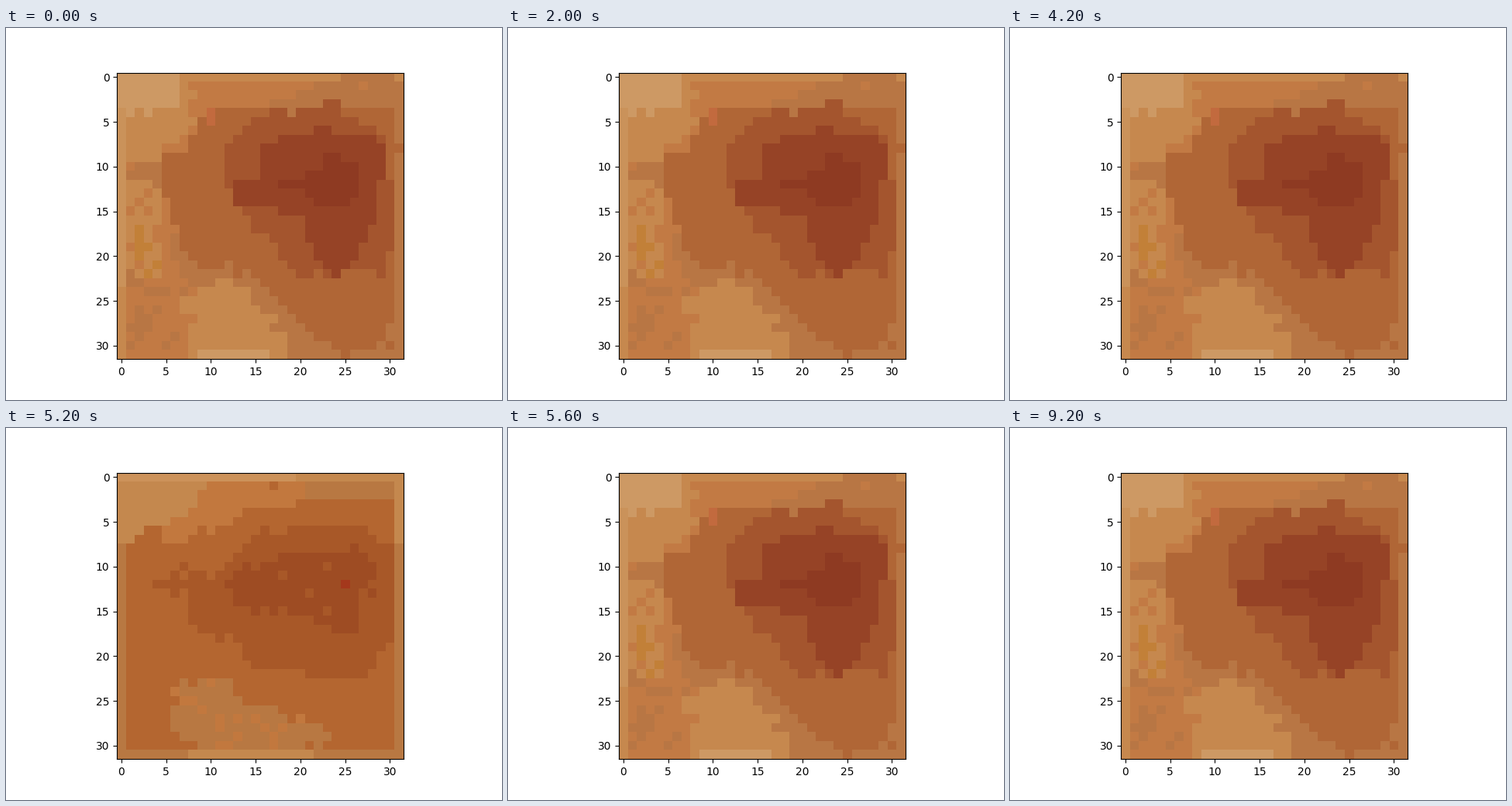
Write a matplotlib script that moves like this. It is 640x480 px and loops after 10000 ms.

```python
import numpy as np
import matplotlib.pyplot as plt
from matplotlib.animation import FuncAnimation
from matplotlib.path import Path

SIZE = 32
STEP_MS = 200
ROWS, COLS = np.mgrid[:SIZE, :SIZE]
CELLS = np.column_stack([COLS.ravel(), ROWS.ravel()])


class Skin:
    """A grid of coloured cells built up from rough-edged patches."""

    def __init__(self, color, seed):
        self.img = np.full((SIZE, SIZE, 3), color, dtype=np.uint8)
        self.rng = np.random.default_rng(seed)

    def patch(self, color, *corners, density=1.0, rough=0.3):
        probe = CELLS + self.rng.normal(0, rough, CELLS.shape)
        inside = Path(corners).contains_points(probe)
        inside &= self.rng.random(len(CELLS)) < density
        self.img[inside.reshape(SIZE, SIZE)] = color

    def box(self, color, left, top, right, bottom):
        self.img[top:bottom, left:right] = color


def offset_mole():
    pale, light, warm = (205, 153, 100), (198, 136, 78), (194, 122, 68)
    dull, brown, rust = (184, 118, 68), (176, 102, 54), (164, 85, 46)
    deep, core = (150, 67, 38), (142, 58, 34)
    s = Skin(warm, 4)
    s.patch(dull, (24, .5), (33, .5), (33, 33), (19, 33), (13, 24), (6, 23),
            (6, 18), (16, 3))
    s.patch(light, (-2, -2), (8, -2), (8, 6.5), (5, 8), (4, 10), (4.8, 14),
            (5, 20), (3, 23), (.5, 24), (.5, 33), (-2, 33))
    s.patch(warm, (.5, 10), (5, 10), (5, 23), (.5, 23), density=.25)
    s.patch(dull, (1.5, 9.6), (5.5, 9.6), (4.5, 11.4), (1.5, 11.4))
    s.patch(dull, (.5, 22), (7, 22), (7, 31), (.5, 31), density=.35)
    s.patch((194, 128, 56), (1.5, 15.5), (4.5, 15.5), (4.5, 25.5),
            (1.5, 25.5), density=.15)
    s.box((202, 146, 90), 0, 4, 1, 24)
    s.box(light, 7, 0, 32, 1)
    s.box(dull, 25, 0, 31, 1)
    s.patch(pale, (-2, -2), (6.5, -2), (6.5, 2.5), (4.5, 3.5), (-2, 3.5))
    s.patch(light, (7, 24), (13, 22.7), (16, 26), (18, 29), (18, 33),
            (7.5, 33), (7.5, 28))
    s.box(pale, 9, 31, 17, 32)
    s.patch(brown, (11, 3.5), (30.5, 3.5), (30.5, 27), (29, 31), (24, 31),
            (21, 29), (18, 25), (14, 22), (9, 21), (6.5, 19), (5.5, 15),
            (4.5, 10.5), (8, 6.5))
    s.patch(rust, (15, 4.5), (19, 3.5), (24, 3), (25, 4.5), (29.5, 6),
            (30.5, 18), (29, 22), (20, 22), (16, 18), (13, 15),
            (11.5, 12), (10.5, 9), (12, 7))
    s.patch(deep, (22, 5.5), (24, 6.4), (28.5, 6.5), (29.5, 8), (28.5, 14),
            (27, 18), (25, 22), (23, 22.5), (21, 18), (20.5, 15.5),
            (17, 14.5), (13, 14.4), (11.5, 11.5), (15.5, 11.5), (15.6, 7.6))
    s.patch(core, (23, 8), (26, 10), (26, 13), (24, 15), (19, 13),
            (18, 11.7), (22.5, 11))
    s.box((194, 106, 62), 10, 4, 11, 6)
    return s.img


def wide_mole():
    pale, light, warm = (204, 146, 90), (196, 136, 78), (194, 120, 62)
    dull, brown = (184, 120, 66), (180, 102, 48)
    rust, deep = (168, 88, 40), (158, 76, 35)
    s = Skin(brown, 7)
    s.patch(warm, (9, .5), (21, .5), (21, 2.5), (15, 3.5), (11, 5.5),
            (5, 7.5), (4, 6))
    s.patch(light, (-2, .5), (9.5, .5), (8.5, 3.5), (6, 5), (2, 6),
            (.5, 8), (-2, 8))
    s.box(dull, 21, 1, 31, 3)
    s.box(dull, 0, 8, 1, SIZE)
    s.box(dull, 31, 8, 32, SIZE)
    s.box(dull, 0, 31, 32, 32)
    s.box(light, 8, 31, 22, 32)
    s.box(light, 31, 1, 32, 8)
    s.box(light, 0, 0, 32, 1)
    s.box(pale, 0, 0, 20, 1)
    patch = ((6, 23), (12.5, 22.7), (14, 25.5), (18, 26), (22.5, 28),
             (22.5, 30.5), (8, 30.5), (5.5, 28))
    s.patch(dull, *patch)
    s.patch(warm, *patch, density=.2)
    s.patch(rust, (16, 6), (26, 5.5), (30.5, 8), (30.5, 18), (28.5, 22),
            (23, 22.5), (14, 21), (12, 18), (8, 17), (7.5, 13), (9, 11),
            (13, 8.5))
    s.patch(rust, (4, 10), (8.5, 9.5), (8.5, 13), (3.5, 13), density=.6)
    s.patch(deep, (18, 8.7), (24, 8), (29, 9), (28, 14), (25, 18), (22, 16),
            (17, 15), (12.5, 13.8), (12, 11), density=.92)
    s.box((164, 56, 28), 25, 12, 26, 13)
    return s.img


def round_mole():
    gray, tan, light = (150, 122, 106), (168, 138, 114), (176, 150, 128)
    dark, core, edge = (138, 106, 92), (128, 92, 84), (158, 132, 114)
    s = Skin(gray, 2)
    s.patch(tan, (4.5, 1.5), (24.5, 1.5), (25.5, 6.5), (27.5, 7),
            (27.5, 11.5), (25.5, 12.8), (21, 12.5), (19.5, 9.5), (16, 8.7),
            (12, 10.7), (8, 13), (6, 14.8), (4.2, 14.5), (3, 6))
    s.patch(light, (7, 4.5), (10, 6), (10, 8), (7, 9.5), (5, 7.5))
    s.patch(light, (20, 4.5), (23, 5), (24.5, 8), (21.5, 8))
    s.patch(edge, (28.4, 24), (30.5, 24), (30.5, 31), (28, 31))
    s.patch(tan, (5, 20.5), (11, 22.5), (12.5, 24.5), (18.5, 24.5),
            (21, 22.5), (25, 21), (28.2, 20.8), (28.5, 28), (28, 31.5),
            (4, 31.5), (1, 29), (3, 24))
    s.patch(light, (6, 26.5), (19, 27.6), (23, 24.5), (27, 24.5),
            (28, 27.5), (25.5, 29), (21, 30.5), (5.5, 30.5), (4.7, 28))
    s.patch(dark, (15, 9.8), (18.5, 12), (20.5, 14), (20.5, 17), (19.5, 20),
            (15, 22), (12.5, 19.5), (9.7, 17.5), (10.5, 14), (12.5, 11.5))
    s.patch(core, (15, 14.5), (17.5, 16), (17, 17.5), (14.5, 18.5),
            (11.6, 17.3), (13, 15.7))
    s.patch(dark, (-2, 11), (1.5, 13), (2, 17), (.5, 20), (-2, 20.5))
    s.patch(dark, (29.6, 12), (33, 12), (33, 14.5), (30.5, 15),
            (30.5, 18.5), (29.6, 18.5))
    return s.img


def resample(img, size):
    idx = ((np.arange(size) + 0.5) * len(img) / size).astype(int)
    return img[np.ix_(idx, idx)]


MAIN, WIDE, ROUND = offset_mole(), wide_mole(), round_mole()
SMALL = resample(WIDE, 28)

# the main picture shows except in these (start ms, end ms) flashes
FLASHES = [(1800, 2000, WIDE), (4000, 4200, ROUND), (5200, 5400, WIDE),
           (5400, 5600, SMALL), (9000, 9200, WIDE)]

fig, ax = plt.subplots(figsize=(6.4, 4.8), dpi=100)
pic = ax.imshow(MAIN, interpolation="nearest")


def picture_at(ms):
    for start, end, img in FLASHES:
        if start <= ms < end:
            return img
    return MAIN


def draw(i):
    img = picture_at(i * STEP_MS)
    end = len(img) - 0.5
    pic.set_data(img)
    pic.set_extent((-0.5, end, end, -0.5))
    ax.set(xlim=(-0.5, end), ylim=(end, -0.5),
           xticks=range(0, len(img), 5), yticks=range(0, len(img), 5))
    return [pic]


anim = FuncAnimation(fig, draw, frames=50, init_func=lambda: draw(0),
                     interval=STEP_MS, repeat=True, repeat_delay=0)
plt.show()
```
